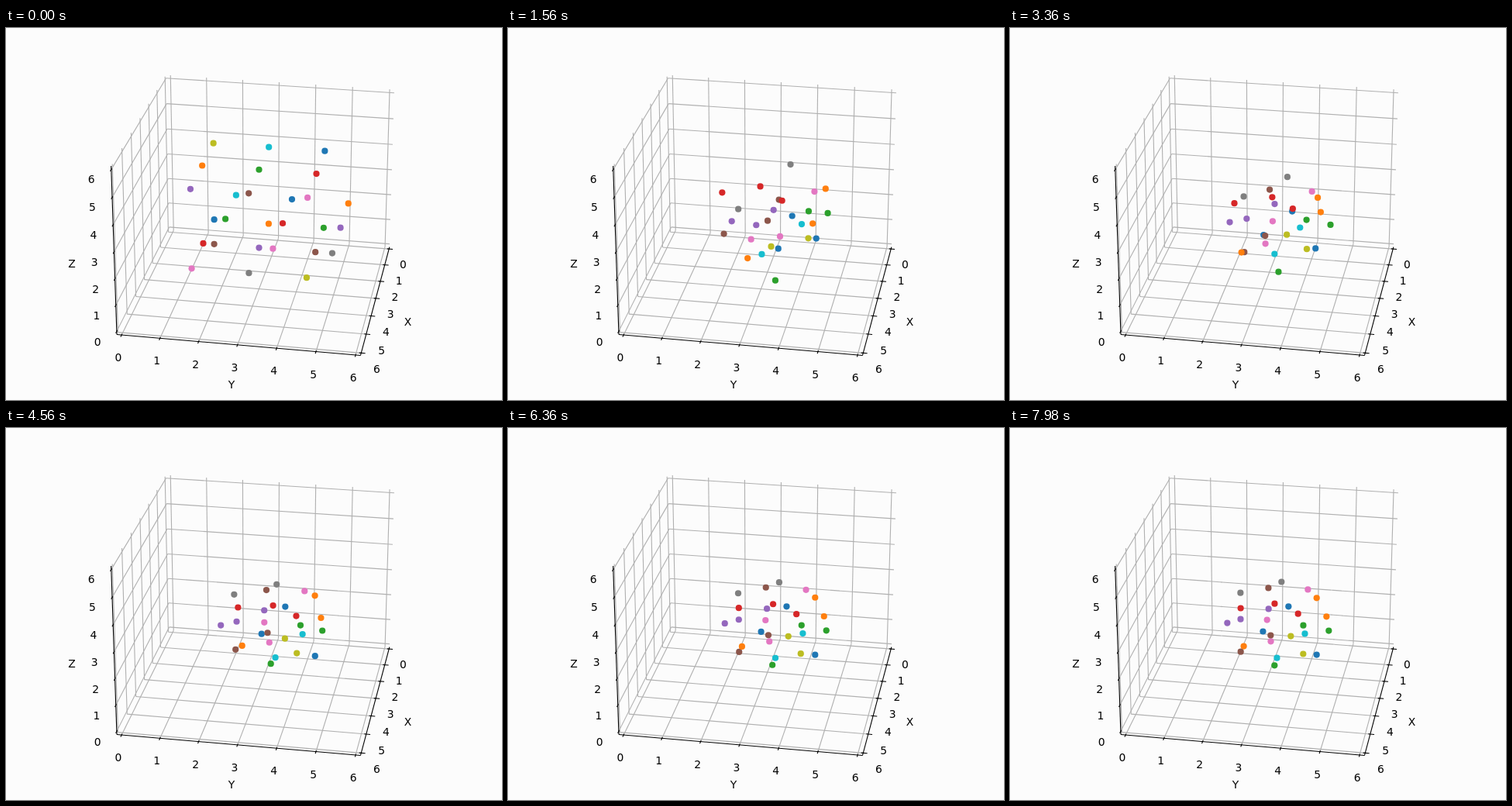
Recreate the animation shown at these times as an HTML page. Size 640 by 480 pixels, loop 8000 ms.

```html
<!DOCTYPE html>
<html lang="en">
<head>
<meta charset="utf-8">
<title>Particle cluster</title>
<style>
  html, body { margin: 0; width: 100%; height: 100%; overflow: hidden; background: #fcfcfc; }
  svg { display: block; width: 640px; height: 480px; }
  text { font: 13.89px "DejaVu Sans", sans-serif; text-anchor: middle; }
  line { stroke-width: 1.11; }
  .grid { stroke: #b0b0b0; }
  .axis { stroke: #000; }
</style>
</head>
<body>
<svg id="stage" viewBox="0 0 640 480"></svg>
<script>
const LOOP = 8000, STEP = 60, COLLAPSE = 1560;
const LO = -0.125, HI = 6.125;
const COLORS = ['#1f77b4', '#ff7f0e', '#2ca02c', '#d62728', '#9467bd',
                '#8c564b', '#e377c2', '#7f7f7f', '#bcbd22', '#17becf'];
const stage = document.getElementById('stage');

function add(tag, attrs, text) {
  const el = document.createElementNS('http://www.w3.org/2000/svg', tag);
  for (const k in attrs) el.setAttribute(k, attrs[k]);
  if (text !== undefined) el.textContent = text;
  return stage.appendChild(el);
}

// Perspective camera: elevation 25 deg, azimuth 10 deg, distance 10.
const rad = Math.PI / 180;
const se = Math.sin(25 * rad), ce = Math.cos(25 * rad);
const sa = Math.sin(10 * rad), ca = Math.cos(10 * rad);

function project([px, py, pz]) {
  const unit = v => (v - LO) / (HI - LO) - 0.5;
  const x = unit(px) * 1.1905, y = unit(py) * 1.1905, z = unit(pz) * 0.8929;
  const scale = 2594.6 / (10 - (x * ce * ca + y * ce * sa + z * se));
  return [
    326.5 + scale * (y * ca - x * sa),
    233.6 - scale * (z * ce - (x * ca + y * sa) * se)
  ];
}

function line(a, b, cls) {
  const [x1, y1] = project(a), [x2, y2] = project(b);
  add('line', { x1, y1, x2, y2, class: cls });
}

// Text hangs just below the given point.
function label([x, y], text) {
  add('text', { x, y: Math.round(y + 10.8) }, text);
}

function drawAxes() {
  const out = HI + 0.104, inn = HI - 0.052;
  const far = HI + 0.4, near = LO - 0.4;
  for (let n = 0; n <= 6; n++) {
    line([n, LO, HI], [n, LO, LO], 'grid');
    line([n, LO, LO], [n, HI, LO], 'grid');
    line([LO, n, HI], [LO, n, LO], 'grid');
    line([LO, n, LO], [HI, n, LO], 'grid');
    line([HI, LO, n], [LO, LO, n], 'grid');
    line([LO, LO, n], [LO, HI, n], 'grid');
  }
  line([LO, HI, LO], [HI, HI, LO], 'axis');
  line([HI, LO, LO], [HI, HI, LO], 'axis');
  line([HI, LO, LO], [HI, LO, HI], 'axis');
  for (let n = 0; n <= 6; n++) {
    line([n, out, LO], [n, inn, LO], 'axis');
    line([out, n, LO], [inn, n, LO], 'axis');
    line([out, LO, n], [inn, LO, n], 'axis');
    label(project([n, far, near]), n);
    label(project([far, n, near]), n);
    label(project([far, near, n]), n);
  }
  label([518.5, 373.4], 'X');
  label([291, 454.4], 'Y');
  label([85, 298.4], 'Z');
}

// Resting place of each ball, one row per lattice row.
const REST = [
  [326, 262], [395, 219], [378, 254],
  [297, 232], [333, 233], [333, 206],
  [336, 275], [297, 212], [378, 291],
  [344, 296], [359, 230], [408, 243],
  [341, 306], [341, 226], [297, 246],
  [297, 288], [331, 247], [350, 198],
  [362, 268], [380, 265], [395, 292],
  [301, 281], [411, 261], [371, 239],
  [280, 251], [336, 267], [384, 208]
];

let seed = 7;
function random() {
  seed = (seed * 16807) % 2147483647;
  return seed / 2147483647;
}

// Balls start on a staggered 3x3x3 lattice.
function lattice(n) {
  const layer = Math.floor(n / 9), shift = layer === 1 ? 0.75 : 0;
  return project([
    1.5 + 1.5 * (Math.floor(n / 3) % 3) + shift,
    1.5 + 1.5 * (n % 3) + shift,
    1.5 + 1.5 * layer
  ]);
}

drawAxes();

const balls = REST.map((rest, n) => ({
  start: lattice(n),
  rest: rest.map(v => v + 0.5),
  phase: [random(), random()].map(v => v * 2 * Math.PI),
  period: 1300 + 700 * random(),
  el: add('circle', { r: 4.1, fill: COLORS[n % 10] })
}));

// The lattice falls in and rebounds, then each ball sways to a stop.
function draw(ms) {
  const t = Math.floor((ms % LOOP) / STEP) * STEP;
  const u = Math.min(1, t / COLLAPSE);
  const fall = (1 - u * u) ** 2 * Math.cos(3 * Math.PI * u);
  const sway = 0.07 * t * Math.exp(-t / 1000);
  for (const { start, rest, phase, period, el } of balls) {
    const [x, y] = rest.map((r, k) => r + (start[k] - r) * fall
      + sway * Math.cos(2 * Math.PI * t / period + phase[k]));
    el.setAttribute('cx', x.toFixed(2));
    el.setAttribute('cy', y.toFixed(2));
  }
}

const begin = performance.now();
function tick() {
  draw(performance.now() - begin);
  requestAnimationFrame(tick);
}
tick();
</script>
</body>
</html>
```
